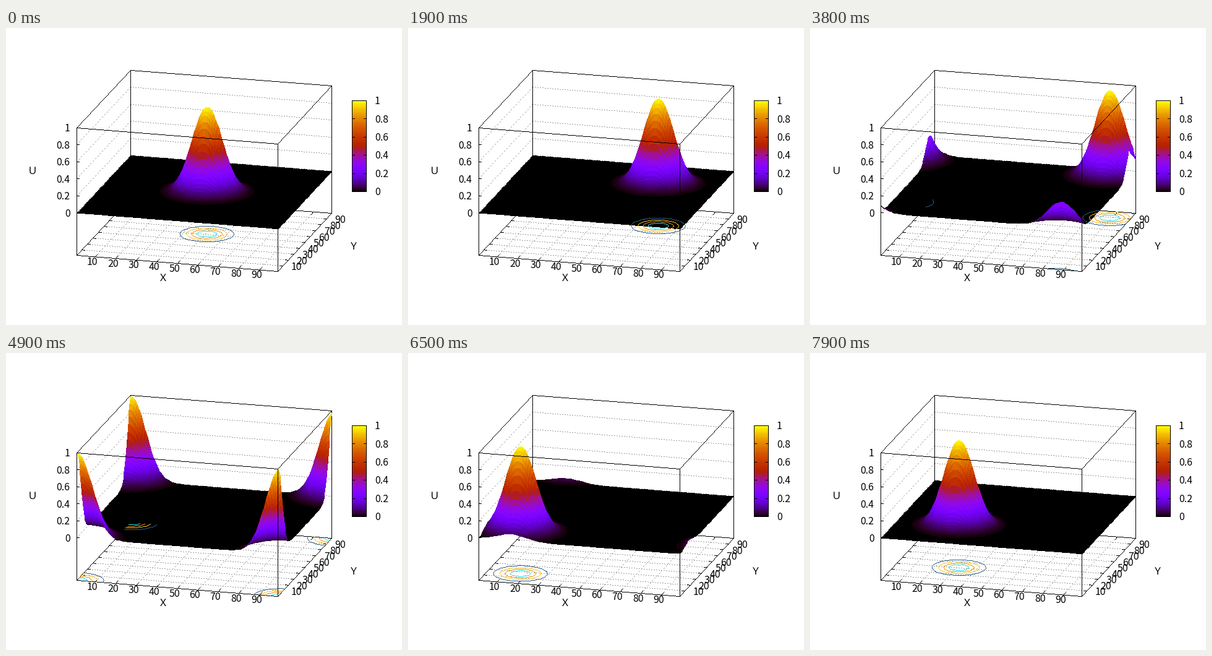
A matplotlib script that plays this animation: 640x480 px, repeating every 8 s.

```python
import numpy as np
import matplotlib.pyplot as plt
from matplotlib.animation import FuncAnimation
from matplotlib.colors import ListedColormap, to_rgba

W, H, DPI = 640, 480, 100
PX = 72 / DPI                      # one pixel in points
FRAMES, STEP = 80, 100
N, PERIOD = 98, 99                 # grid cells per side, wrap length
LEVELS = [0.2, 0.4, 0.6, 0.8]
RINGS = ["#306080", "#ffc020", "#f09000", "#30d8dc"]
FONT = "Noto Sans CJK JP"

fig = plt.figure(figsize=(W / DPI, H / DPI), dpi=DPI, facecolor="white")
ax = fig.add_axes([0, 0, 1, 1])
ax.set_xlim(-0.5, W - 0.5)
ax.set_ylim(H - 0.5, -0.5)
ax.set_autoscale_on(False)
ax.axis("off")

# Palette: red = sqrt(v), green = v^3, blue = sin(2 pi v)
v = np.linspace(0, 1, 128)
palette = ListedColormap(
    np.c_[np.sqrt(v), v**3, np.clip(np.sin(2 * np.pi * v), 0, 1)])


class Layer:
    """Transparent sheet for crisp one-pixel lines."""

    def __init__(self, zorder):
        self.px = np.zeros((H, W, 4))
        self.image = ax.imshow(self.px, extent=(-0.5, W - 0.5, H - 0.5, -0.5),
                               aspect="auto", interpolation="nearest",
                               zorder=zorder)

    def line(self, points, color="black", dotted=False):
        rgba = to_rgba(color)
        pts = np.floor(np.asarray(points) + 0.5).astype(int)
        for a, b in zip(pts[:-1], pts[1:]):
            n = max(abs(b - a).max(), 1)
            k = np.arange(n + 1)
            if dotted:
                k = k[k % 4 < 2]
            x, y = np.floor(a[:, None] + (b - a)[:, None] * k / n + 0.5).astype(int)
            self.px[y, x] = rgba

    def show(self):
        self.image.set_data(self.px)


back, rings, front = Layer(2), Layer(4), Layer(5)


def project(x, y, z):
    """Grid position (0..98) and height (-0.5..1) to pixels."""
    return (114 + (325 * x + 87 * y) / N,
            161 + (25.7 * x - 93.3 * y) / N + (1 - z) * 206 / 1.5)


def edge(layer, *corners):
    layer.line([project(*c) for c in corners])


def grid(*corners):
    back.line([project(*c) for c in corners], "#a0a0a0", dotted=True)


def tick(p, dx, dy):
    back.line([p, (p[0] + dx, p[1] + dy)])


def label(x, y, s, ha="center"):
    ax.text(x, y + 5.7, s, ha=ha, va="baseline", fontsize=16 * PX,
            family=FONT, color="black", zorder=6)


def draw_grid():
    for k in range(9, N, 10):
        grid((k, 0, -0.5), (k, N, -0.5))
        grid((0, k, -0.5), (N, k, -0.5))
    for z in np.arange(5) / 5:
        grid((0, 0, z), (0, N, z), (N, N, z))


def draw_box():
    low, top = -0.5, 1
    edge(back, (0, 0, low), (N, 0, low), (N, N, low), (0, N, low), (0, 0, low))
    edge(back, (0, 0, top), (0, N, top), (N, N, top))
    for x, y in [(0, 0), (0, N), (N, N)]:
        edge(back, (x, y, low), (x, y, top))
    # Edges in front of the surface
    edge(front, (0, 0, top), (N, 0, top), (N, N, top))
    edge(front, (N, 0, low), (N, 0, top))


def draw_ticks():
    for n in range(10, 100, 10):
        k = n - 1
        p = project(k, 0, -0.5)
        tick(p, 3.4, -3.6)
        tick(project(k, N, -0.5), -3.4, 3.6)
        label(p[0] - 4.8, p[1] + 7.6, str(n))
        p = project(N, k, -0.5)
        tick(p, -5, -0.4)
        tick(project(0, k, -0.5), 5, 0.4)
        label(p[0] + 13.2, p[1] + 1, str(n), "left")
    for z in np.arange(6) / 5:
        p = project(0, 0, z)
        tick(p, 4, 0)
        label(103, p[1], f"{z:g}", "right")
    # Full-width capitals
    label(253.5, 402.5, "\uff38")
    label(561.5, 351.5, "\uff39")
    label(42.5, 230, "\uff35")


def draw_colorbar():
    x0, x1, y0, y1 = 559, 582, 264, 117
    ax.pcolormesh([x0, x1], np.linspace(y0, y1, 129), v[:, None],
                  cmap=palette, vmin=0, vmax=1, antialiased=False, zorder=1)
    back.line([(x0, y0), (x1, y0), (x1, y1), (x0, y1), (x0, y0)])
    for i in range(6):
        y = y0 + (y1 - y0) * i / 5
        tick((x0, y), 4, 0)
        tick((x1, y), -4, 0)
        label(595.5, y, f"{i / 5:g}", "left")


draw_grid()
draw_box()
draw_ticks()
draw_colorbar()
back.show()
front.show()

# Rows run from back to front so nearer cells paint over farther ones
axis = np.arange(N + 1)
gx, gy = np.meshgrid(axis, axis[::-1])
floor_x, floor_y = project(gx, gy, -0.5)
meshes = []


def bump(center):
    """Periodic Gaussian along one axis."""
    return sum(np.exp(-(axis - center + k * PERIOD) ** 2 / 100)
               for k in (-1, 0, 1))


def draw_rings(u):
    rings.px[:] = 0
    curves = ax.contour(floor_x, floor_y, u, levels=LEVELS)
    for color, segments in zip(RINGS, curves.allsegs):
        for points in segments:
            rings.line(points, color)
    curves.remove()
    rings.show()


def update(i):
    while meshes:
        meshes.pop().remove()
    g = bump((50 + i) % PERIOD)
    u = np.outer(g[::-1], g)
    mean = (u[1:, 1:] + u[1:, :-1] + u[:-1, 1:] + u[:-1, :-1]) / 4
    sx, sy = project(gx, gy, u)
    meshes.append(ax.pcolormesh(np.round(sx), np.round(sy), mean,
                                cmap=palette, vmin=0, vmax=1, shading="flat",
                                edgecolors="none", antialiased=False, zorder=3))
    draw_rings(u)
    return []


anim = FuncAnimation(fig, update, frames=FRAMES, init_func=lambda: [],
                     interval=STEP, repeat=True, repeat_delay=0, blit=False)
plt.show()
```
